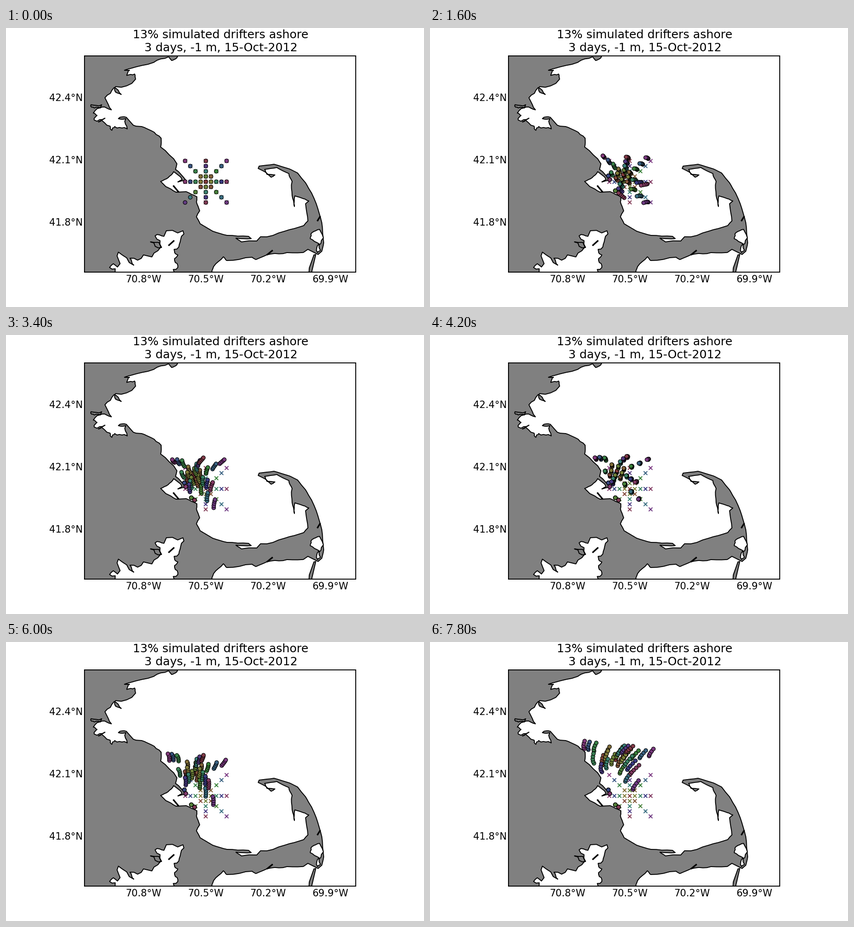
Animation of 900 by 600 pixels, one loop 8 s. Source, as a matplotlib script:

```python
import colorsys

import matplotlib.pyplot as plt
import numpy as np
from matplotlib.animation import FuncAnimation

plt.rcParams["font.family"] = "DejaVu Sans"

FRAMES, TAIL, STEP = 40, 5, 11.18
CENTER = np.array([430.3, 330.5])
LEFT, TOP, RIGHT, BOTTOM = 169, 60, 753, 525
rng = np.random.default_rng(4)


def pts(*xy):
    return np.array(xy, float).reshape(-1, 2)


def ragged(rough, *xy):
    """Line through a few points, roughened by midpoint displacement."""
    path = pts(*xy)
    for _ in range(2):
        a, b = path[:-1], path[1:]
        normal = (b - a)[:, ::-1] * [1, -1]
        mid = (a + b) / 2 + normal * rng.normal(0, rough, (len(a), 1))
        path = np.vstack([np.stack([a, mid], 1).reshape(-1, 2), path[-1:]])
    return path


# Key points of the coast in stage pixels, from the north round to the west
land = np.vstack([
    ragged(0.03, 160, 50, 374, 50, 368, 64, 357, 70, 350, 62, 318, 74,
           268, 87, 255, 91),
    ragged(0.10, 266, 91, 260, 102, 277, 99, 279, 110, 236, 126, 236, 138,
           248, 143, 233, 128, 213, 150),
    ragged(0.13, 220, 164, 227, 176, 207, 170, 190, 172, 183, 165, 206, 165,
           188, 183, 196, 188, 190, 198, 213, 194, 199, 202, 224, 211,
           228, 220, 234, 212, 255, 214, 261, 217, 258, 195, 242, 195, 259, 192),
    ragged(0.04, 274, 209, 298, 214, 313, 221, 334, 237, 333, 256, 368, 292,
           365, 304, 387, 327, 370, 331, 379, 326, 361, 309, 349, 322,
           333, 330, 344, 341, 366, 353, 388, 352, 411, 363, 410, 374,
           417, 393, 410, 406, 418, 421),
    ragged(0.02, 445, 437, 476, 446, 522, 448, 528, 453, 495, 452, 507, 460,
           540, 458, 548, 449, 600, 437, 641, 425, 650, 415, 645, 378),
    ragged(0.04, 652, 372, 640, 367, 622, 361, 621, 384, 616, 360, 616, 330,
           609, 313, 583, 300, 557, 304, 562, 315, 579, 316, 571, 321, 543, 302),
    ragged(0.01, 545, 297, 577, 293, 610, 303, 628, 312, 645, 333, 658, 355,
           668, 378, 680, 419, 684, 462, 680, 480, 672, 487),
    ragged(0.05, 650, 476, 605, 483, 570, 486, 538, 498, 530, 493, 475, 500,
           468, 492, 447, 513, 442, 530),
    ragged(0.20, 361, 530, 370, 515, 363, 500, 370, 488, 362, 476, 375, 460,
           381, 436, 340, 448, 321, 447, 335, 472, 311, 460, 327, 479,
           296, 488, 267, 495, 275, 510, 242, 482, 240, 514, 223, 515,
           237, 530),
    pts(160, 530)])
lagoon = ragged(0.15, 655, 453, 659, 440, 675, 433, 679, 457, 677, 478,
                671, 483, 674, 464, 655, 453)
sandbar = pts(652, 530, 653, 516, 663, 488, 667, 487, 657, 530)
bars = pts(361, 340, 371, 352, 351, 467, 361, 458, 563, 487, 573, 479,
           671, 414, 676, 406).reshape(-1, 2, 2)

# Drifters start on eight arms of four around a centre
ARMS = dict(SW=(-1, 1), SE=(1, 1), NE=(1, -1), NW=(-1, -1),
            W=(-1, 0), E=(1, 0), S=(0, 1), N=(0, -1))
KNOTS = np.array([0, 5, 11, 17, 25, 34, 39.0])

# Places of a few drifters at the knots; the rest follow from these
guides = {
    ("N", 0): pts(417, 318, 413, 314, 402, 297, 405, 287, 400, 257, 411, 231),
    ("NW", 2): pts(397, 299, 389, 287, 379, 270, 372, 259, 355, 237, 358, 217),
    ("NW", 4): pts(374, 277, 368, 275, 358, 268, 352, 258, 335, 232, 333, 213),
    ("N", 4): pts(427, 279, 416, 277, 425, 264, 420, 258, 422, 238, 437, 224),
    ("NE", 4): pts(469, 280, 459, 279, 470, 268, 463, 268, 472, 247, 481, 230),
    ("E", 4): pts(466, 336, 442, 339, 445, 317, 436, 317, 431, 286, 450, 265),
    ("SE", 4): pts(468, 374, 450, 377, 450, 354, 446, 353, 437, 320, 449, 298),
    ("S", 3): pts(411, 349, 400, 343, 394, 321, 387, 311, 373, 282, 369, 262),
    ("W", 2): pts(391, 314, 388, 310, 378, 295, 375, 290, 356, 264, 352, 240),
}
# Drifters that run ashore: step and place
ashore = {("W", 3): (4, (384, 318)), ("W", 4): (3, (387, 326)),
          ("SW", 2): (3, (399, 350)), ("S", 4): (8, (406, 355))}


def start(arm, ring):
    return CENTER + STEP * ring * np.array(ARMS[arm])


def tide(t):
    """Back-and-forth shift with the 12.4 hour tide."""
    swing = np.sin(2 * np.pi * (np.asarray(t) - 15) / 12.4)
    return swing[:, None] * [4.3, -3.0]


def smooth(t, p):
    """Hermite curve through the knots, sampled at every frame."""
    slope = np.gradient(p, t, axis=0)
    now = np.arange(FRAMES)
    i = np.clip(np.searchsorted(t, now, side="right") - 1, 0, len(t) - 2)
    h = (t[i + 1] - t[i])[:, None]
    u = (now - t[i])[:, None] / h
    return ((2 * u**3 - 3 * u**2 + 1) * p[i] + (u**3 - 2 * u**2 + u) * h * slope[i]
            + (3 * u**2 - 2 * u**3) * p[i + 1] + (u**3 - u**2) * h * slope[i + 1])


def plate(a, b):
    """Thin-plate kernel between two sets of places."""
    r2 = ((a[:, None] - b[None]) ** 2).sum(-1) / STEP**2
    return r2 * np.log(r2 + 1e-12)


def plane(a):
    return np.column_stack([np.ones(len(a)), (a - CENTER) / STEP])


sites = np.array([start(*key) for key in guides])
shifts = np.array([(path - site).ravel() for path, site in zip(guides.values(), sites)])
system = np.block([[plate(sites, sites), plane(sites)],
                   [plane(sites).T, np.zeros((3, 3))]])
weights = np.linalg.solve(system, np.vstack([shifts, np.zeros((3, shifts.shape[1]))]))


def drift(origin):
    """Slow flow spread from the guides, with the tide on top."""
    at = origin[None]
    shift = np.hstack([plate(at, sites), plane(at)]) @ weights
    path = np.vstack([at, origin + shift.reshape(-1, 2)])
    return smooth(KNOTS, path - tide(KNOTS)) + tide(np.arange(FRAMES))


def run_ashore(origin, step, place):
    part = np.clip(np.arange(FRAMES) / step, 0, 1)[:, None]
    return origin + (np.array(place) - origin) * part


def hue(n):
    return colorsys.hls_to_rgb(n / 33, 0.37, 0.38)


tracks, marks = [drift(CENTER)], [(CENTER, hue(0))]
for ring in range(1, 5):
    for arm in ARMS:
        origin, color = start(arm, ring), hue(len(tracks))
        if arm == "SW" and ring > 2:
            tracks.append(origin[None])      # released on land, never moves
            continue
        marks.append((origin, color))
        stop = ashore.get((arm, ring))
        tracks.append(run_ashore(origin, *stop) if stop else drift(origin))

fig = plt.figure(figsize=(9, 6), dpi=100, facecolor="white")
ax = fig.add_axes([LEFT / 900, 1 - BOTTOM / 600,
                   (RIGHT - LEFT) / 900, (BOTTOM - TOP) / 600])
ax.set(xlim=(LEFT, RIGHT), ylim=(BOTTOM, TOP), xticks=[], yticks=[])
for spine in ax.spines.values():
    spine.set_linewidth(1.4)

for shape, fill in [(land, "0.5"), (lagoon, "white"), (sandbar, "0.5")]:
    ax.fill(*shape.T, facecolor=fill, edgecolor="black", linewidth=1.4,
            joinstyle="round", zorder=1)
for bar in bars:
    ax.plot(*bar.T, color="black", linewidth=2.4, zorder=1)


def label(x, y, text, size, ha="center"):
    ax.text(x, y, text, fontsize=size, ha=ha, va="baseline")


label(462, 22, "13% simulated drifters ashore", 18)
label(462.5, 50, "3 days, -1 m, 15-Oct-2012", 18)
for n in range(4):
    label(295.9 + 134.2 * n, 547, f"{70.8 - 0.3 * n:.1f}°W", 15)
for n in range(3):
    label(165.5, 156.8 + 134.2 * n, f"{42.4 - 0.3 * n:.1f}°N", 15, "right")

for (x, y), color in marks:
    ax.plot(x, y, "x", color=color, markersize=6.3, markeredgewidth=1.4, zorder=2)
dots = ax.scatter([], [], s=36, edgecolors="black", linewidths=0.8, zorder=3)


def draw(frame):
    places, fills = [], []
    for n, track in enumerate(tracks):
        tail = track[max(0, frame - TAIL + 1):frame + 1]
        places.extend(tail)
        fills.extend([hue(n)] * len(tail))
    dots.set_offsets(places)
    dots.set_facecolors(fills)
    return [dots]


anim = FuncAnimation(fig, draw, frames=FRAMES, interval=200, repeat=True,
                     repeat_delay=0, blit=False)
plt.show()
```
